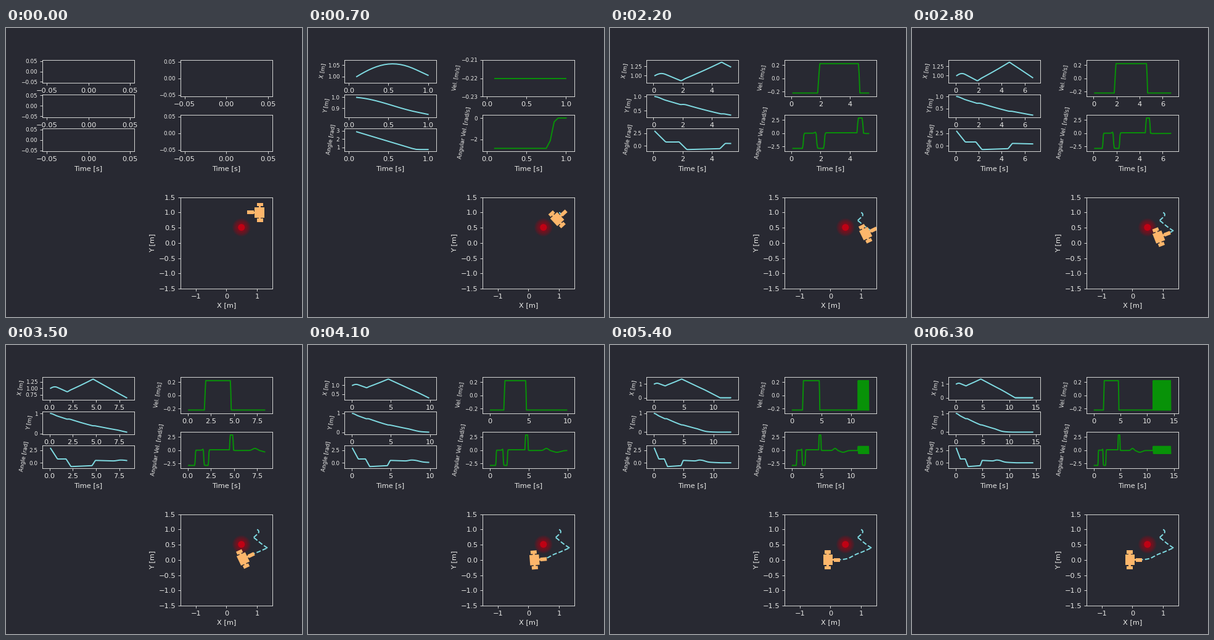
Write a matplotlib script that moves like this. It is 480 px wide and 469 px high and loops after 7.5 s.

```python
import numpy as np
import matplotlib.pyplot as plt
from matplotlib.animation import FuncAnimation
from matplotlib.patches import Circle, Polygon

W, H, DPI = 480, 469, 80
BG, FG = "#282932", "#e9e9e7"
CYAN, GREEN, ORANGE, RED = "#80dce3", "#089208", "#fdb66b", "#d00012"
DT, V_MAX, W_MAX, ARRIVAL = 0.05, 0.22, 2.84, 11.12

plt.rcParams.update({
    "font.family": "DejaVu Sans", "font.size": 10.2, "lines.linewidth": 1.75,
    "figure.facecolor": BG, "axes.facecolor": BG,
    "axes.edgecolor": FG, "axes.labelcolor": FG, "text.color": FG,
    "xtick.color": FG, "ytick.color": FG,
})


def ramp(t, start, rise=0.08):
    return np.clip((t - start) / rise, 0, 1)


def pulse(t, on, off):
    return ramp(t, on) - ramp(t, off)


def bump(t, center, width):
    return np.exp(-((t - center) / width) ** 2)


def integrate(start, rate):
    return start + np.append(0, np.cumsum(rate * DT))


def drive():
    """Commands and the resulting pose of the robot."""
    t = DT * np.arange(1, 289)
    # reverse, forward, reverse, with a full-rate spin around each change
    v = V_MAX * (2 * ramp(t, 1.8, 0.14) - 2 * ramp(t, 4.62) - 1)
    w = W_MAX * (pulse(t, 4.5, 4.87) - pulse(t, 1.69, 2.23)
                 - pulse(t, -1, 0.78))
    # gentle steering on the straight legs
    w += 0.2 * bump(t, 1.68, 0.12) + 0.08 * pulse(t, 2.3, 4.5)
    w += 0.4 * bump(t, 7.25, 0.35) - 0.33 * bump(t, 8.6, 0.6)
    w -= 0.06 * pulse(t, 5, ARRIVAL)
    # chatter around the goal
    done = t > ARRIVAL
    flip = (-1.0) ** np.arange(len(t))
    v = np.where(done, V_MAX * flip, v)
    w = np.where(done, 0.05 + 0.65 * flip, w)

    th = integrate(3.0, w[:-1])
    mid = (th[:-1] + th[1:]) / 2
    x = integrate(0.989, v[:-1] * np.cos(mid))
    y = integrate(1.0, v[:-1] * np.sin(mid))
    # let the run settle on the origin
    fade = ramp(t, 5, ARRIVAL - 5)
    x, y, th = (q - fade * q[done.argmax()] for q in (x, y, th))
    return t, x, y, np.where(done, 0, th), v, w


def limits(q):
    if not len(q):
        return -0.055, 0.055
    pad = 0.1 * np.ptp(q) + 0.01
    return q.min() - pad, q.max() + pad


def box(u, v, length, width):
    """Rectangle centred on (u, v) in the robot's own frame."""
    corners = np.array([(-1, -1), (1, -1), (1, 1), (-1, 1)])
    return corners * (length / 2, width / 2) + (u, v)


t, x, y, th, v, w = drive()

fig = plt.figure(figsize=(W / DPI, H / DPI), dpi=DPI)
grid = fig.add_gridspec(2, 2, left=59 / W, right=432 / W,
                        top=1 - 52 / H, bottom=1 - 423 / H,
                        wspace=0.5, hspace=0.5)
left = grid[0, 0].subgridspec(3, 1, hspace=0.5).subplots()
right = grid[0, 1].subgridspec(2, 1, hspace=0.5).subplots()

names = ["X [m]", "Y [m]", "Angle [rad]", "Vel. [m/s]", "Angular Vel. [rad/s]"]
plots = []
for ax, name, q in zip([*left, *right], names, (x, y, th, v, w)):
    ax.tick_params(axis="y", labelsize=8)
    line, = ax.plot([], [], color=CYAN if ax in left else GREEN)
    plots.append((ax, name, q, line))
for ax in (left[-1], right[-1]):
    ax.set_xlabel("Time [s]")

area = fig.add_subplot(grid[1, 1])
area.set(xlim=(-1.5, 1.5), ylim=(-1.5, 1.5),
         xticks=range(-1, 2), yticks=np.arange(-1.5, 1.6, 0.5))
area.set_xlabel("X [m]")
area.set_ylabel("Y [m]", labelpad=5)
for r in np.linspace(0.3, 0.1, 14):
    area.add_patch(Circle((0.49, 0.51), r, fc=RED, ec="none", alpha=0.055))
area.add_patch(Circle((0.49, 0.51), 0.11, fc=RED, ec="none", alpha=0.8))
trail, = area.plot([], [], "--", color=CYAN)

PARTS = [
    box(-0.09, 0, 0.31, 0.34),                           # body
    *(box(-0.1, s * 0.255, 0.2, 0.11) for s in (-1, 1)),  # wheels
    box(-0.1, 0, 0.07, 0.5),                             # axle
    box(0.085, 0, 0.05, 0.07),                           # link
    box(0.205, 0, 0.21, 0.12),                           # nose
]
robot = [area.add_patch(Polygon(p, fc=ORANGE, ec="none", zorder=3))
         for p in PARTS]


def place(px, py, a):
    c, s = np.cos(a), np.sin(a)
    for patch, part in zip(robot, PARTS):
        patch.set_xy(part @ np.array([(c, s), (-s, c)]) + (px, py))


def sim_time(i):
    return np.interp(i, [1, 7, 22, 35, 46, 61], [0.1, 1, 5.3, 8.3, 11.15, 14.4])


def update(i):
    n = int(round(sim_time(i) / DT)) if i else 0
    for ax, name, q, line in plots:
        line.set_data(t[1:n], q[1:n])
        ax.set_ylabel(name if n else "", fontsize=8, rotation=80, labelpad=3)
        ax.set_xlim(limits(t[:n]))
        ax.set_ylim(limits(q[:n]))
    trail.set_data(x[1:n], y[1:n])
    place(*((x[n - 1], y[n - 1], th[n - 1]) if n else (0.99, 1, np.pi)))
    return []


anim = FuncAnimation(fig, update, frames=75, interval=100, blit=False,
                     repeat=True, repeat_delay=0)
plt.show()
```
